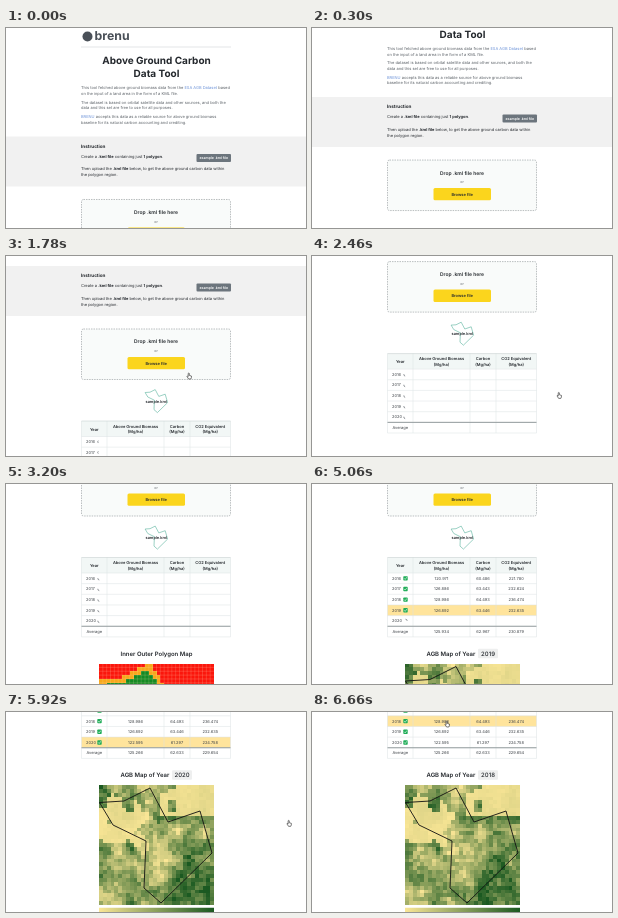
Animation, 300 px wide and 200 px high, one loop 6680 ms. Source, as an HTML page with a canvas:

```html
<!DOCTYPE html>
<html lang="en">
<head>
<meta charset="utf-8">
<title>Above Ground Carbon Data Tool</title>
<style>
html, body { margin: 0; width: 300px; height: 200px; overflow: hidden; background: #fff; }
canvas { display: block; }
</style>
</head>
<body>
<canvas id="stage" width="300" height="200"></canvas>
<script>
const LOOP = 6680;
const ctx = document.getElementById('stage').getContext('2d');
ctx.textRendering = 'geometricPrecision';

const INK = '#24282d', GREY = '#5c6268', CELL = '#3c4146', RULE = '#dbe1e3';
const PALE = [250, 230, 150], DENSE = [27, 89, 33];
const MAP = { x: 93, y: 369.5, w: 115, h: 120, cols: 30, rows: 31 };
const TABLE = { top: 263.5, body: 279, rowH: 10.65, cols: [75.5, 101, 158, 184, 224.5] };
const CENTERS = TABLE.cols.slice(1).map((x, i) => (x + TABLE.cols[i]) / 2);
const BIOMASS = [120.971, 126.886, 128.986, 126.892, 122.595];
const YEARS = BIOMASS.map((_, i) => 2016 + i);
const UPLOAD = 1640, OUTLINE_MAP = 2900, FIRST_ROW = 4160, ROW_STEP = 285;

const parcel = new Path2D('M.5 17.5L25 16L51 3L69 37L101 26L113 68L62 118L45 103L47 56L14 40Z');

// Key points: time, then values
const SCROLL = [[0, 0], [690, 98.5], [2080, 98.5], [2660, 190], [5445, 190], [5880, 296.5], [LOOP, 296.5]];
const UPLOAD_PATH = [[700, -6, 188], [1360, 79, 98], [1780, 182, 117], [2700, 258, 140], [3100, 304, 150]];
const HOVER_PATH = [[5860, 304, 120], [6120, 134, 30], [6580, 134, 9], [LOOP, 134, 9]];

const mix = (a, b, u) => a + (b - a) * u;
const ease = u => (1 - Math.cos(Math.PI * u)) / 2;

// Eased values at time t, or null outside the keys
function follow(keys, t) {
  const i = keys.findIndex(k => k[0] > t);
  if (i < 1) return null;
  const [t0, ...from] = keys[i - 1], [t1, ...to] = keys[i];
  return from.map((v, k) => mix(v, to[k], ease((t - t0) / (t1 - t0))));
}

function hash(x, y, seed) {
  const v = Math.sin(x * 127.1 + y * 311.7 + seed * 74.7) * 43758.5453;
  return v - Math.floor(v);
}

function noise(x, y, seed) {
  const i = Math.floor(x), j = Math.floor(y), u = ease(x - i), v = ease(y - j);
  return mix(mix(hash(i, j, seed), hash(i + 1, j, seed), u),
    mix(hash(i, j + 1, seed), hash(i + 1, j + 1, seed), u), v);
}

function raster(color) {
  const tile = document.createElement('canvas');
  tile.width = MAP.cols;
  tile.height = MAP.rows;
  const g = tile.getContext('2d');
  for (let r = 0; r < MAP.rows; r++)
    for (let c = 0; c < MAP.cols; c++) {
      g.fillStyle = color(c * MAP.w / MAP.cols, r * MAP.h / MAP.rows);
      g.fillRect(c, r, 1, 1);
    }
  return tile;
}

const outlineMap = raster((x, y) => {
  let hits = 0;
  for (let i = 0; i < 9; i++)
    hits += ctx.isPointInPath(parcel, x + i % 3 * 1.9, y + Math.floor(i / 3) * 1.9);
  return hits === 9 ? '#148a23' : hits ? '#f7a81b' : '#fb160c';
});

// Noisy forest with ragged clearings at upper left and upper right
const yearMaps = YEARS.map(year => raster((x, y) => {
  const clearing = Math.min(Math.hypot(x - 19, y - 40) / 25, Math.hypot(x - 93, y - 8) / 29);
  const ragged = clearing + noise(x / 9, y / 9, 5) - .5;
  const forest = .5 + .8 * (noise(x / 15, y / 15, 2) - .5)
    + .3 * (noise(x / 8, y / 8, year) - .5) + .35 * (hash(x, y, year) - .5);
  const v = Math.min(1, Math.max(0, ragged < .9 ? forest * .12 : forest));
  return `rgb(${PALE.map((p, i) => Math.round(mix(p, DENSE[i], v)))})`;
}));

function box(x, y, w, h, fill, radius = 0) {
  ctx.fillStyle = fill;
  ctx.beginPath();
  ctx.roundRect(x, y, w, h, radius);
  ctx.fill();
}

function line(x1, y1, x2, y2, color, width = .5) {
  ctx.strokeStyle = color;
  ctx.lineWidth = width;
  ctx.beginPath();
  ctx.moveTo(x1, y1);
  ctx.lineTo(x2, y2);
  ctx.stroke();
}

function outline(path, x, y, scale, color, width) {
  ctx.save();
  ctx.translate(x, y);
  ctx.scale(scale, scale);
  ctx.strokeStyle = color;
  ctx.lineWidth = width / scale;
  ctx.stroke(path);
  ctx.restore();
}

// y is the visual middle of the line
function text(s, x, y, size = 4, { weight = 400, color = INK, align = 'center' } = {}) {
  ctx.font = `${weight} ${size}px Inter, sans-serif`;
  ctx.textAlign = align;
  ctx.fillStyle = color;
  ctx.fillText(s, x, y + size * .35);
  return ctx.measureText(s).width;
}

// Left-aligned line whose *marked* parts take another style
function rich(s, y, color, marked) {
  let x = 75;
  s.split('*').forEach((part, i) => {
    x += text(part, x, y, 4, { color, align: 'left', ...(i % 2 ? marked : {}) });
  });
}

const INTRO = [
  'This tool fetched above ground biomass data from the *ESA AGB Dataset* based',
  'on the input of a land area in the form of a KML file.',
  'The dataset is based on orbital satellite data and other sources, and both the',
  'data and this set are free to use for all purposes.',
  '*BRENU* accepts this data as a reliable source for above ground biomass',
  'baseline for its natural carbon accounting and crediting.'
];

function drawIntro() {
  box(76.5, 3.5, 10, 10, '#4a5058', 5);
  text('brenu', 88.5, 8, 12.3, { weight: 700, color: '#4a5058', align: 'left' });
  line(75, 19, 225, 19, '#c9cdd0');
  text('Above Ground Carbon', 150.5, 33, 10, { weight: 700 });
  text('Data Tool', 150.5, 45.5, 10, { weight: 700 });
  INTRO.forEach((s, i) =>
    rich(s, 59.8 + Math.floor(i / 2) * 14.4 + i % 2 * 5.8, GREY, { color: '#6d93d8' }));

  box(0, 108.5, 300, 50, '#f1f1f1');
  const bold = { weight: 700 };
  text('Instruction', 75, 118.3, 4.6, { weight: 700, align: 'left' });
  rich('Create a *.kml file* containing just *1 polygon*.', 128.5, INK, bold);
  rich('Then upload the *.kml file* below, to get the above ground carbon data within', 140.9, INK, bold);
  rich('the polygon region.', 146.8, INK);
  box(190.5, 126, 34.5, 8, '#6c757d', 1);
  text('example .kml file', 207.8, 130, 3.5, { weight: 600, color: '#fff' });
}

function drawUpload(t) {
  box(75.5, 171.5, 149, 50.5, '#f9fbfa', 2);
  ctx.strokeStyle = '#8f9599';
  ctx.lineWidth = .6;
  ctx.setLineDash([1.5, 1]);
  ctx.stroke();
  ctx.setLineDash([]);
  text('Drop .kml file here', 150, 184.2, 5, { weight: 600 });
  text('or', 150, 193.6, 3.6, { color: GREY });
  box(121.5, 199.5, 57.5, 12.3, '#fbd51d', 1.5);
  text('Browse file', 150.2, 205.7, 4, { weight: 600 });
  if (t < UPLOAD) return;
  outline(parcel, 139, 231.5, .2, '#58b39c', .6);
  text('sample.kml', 150.3, 244, 3.9, { weight: 600 });
}

function drawStatus(x, y, t, done) {
  if (done) {
    box(x - 2.2, y - 2.2, 4.4, 4.4, '#20ad58', .7);
    outline(new Path2D('M-1.3 0L-.3 1.1L1.4-1.2'), x, y, 1, '#fff', .6);
  } else if (t >= UPLOAD) {
    const turn = t / 750 * 2 * Math.PI;
    ctx.strokeStyle = '#4d555b';
    ctx.lineWidth = .6;
    ctx.beginPath();
    ctx.arc(x, y, 1.7, turn, turn + Math.PI / 2);
    ctx.stroke();
  }
}

function drawValues(biomass, y) {
  const carbon = biomass / 2;
  [biomass, carbon, carbon * 44 / 12].forEach((v, i) =>
    text(v.toFixed(3), CENTERS[i + 1], y, 4, { color: CELL }));
}

function drawTable(t, active, count) {
  const { top, body, rowH, cols } = TABLE, bottom = body + rowH * 6;
  const rowMiddle = i => body + (i + .5) * rowH;
  box(75.5, top, 149, body - top, '#f2f7f6');
  if (active >= 0) box(75.5, body + active * rowH, 149, rowH, '#ffe49c');
  cols.forEach(x => line(x, top, x, bottom, RULE));
  line(75.5, top, 224.5, top, '#bfc9c9');
  for (let y = body; y < bottom + 1; y += rowH) line(75.5, y, 224.5, y, RULE);
  line(75.5, bottom - rowH, 224.5, bottom - rowH, '#8c9396', .9);

  const head = { weight: 600 };
  text('Year', CENTERS[0], 271.7, 4, head);
  ['Above Ground Biomass', 'Carbon', 'CO2 Equivalent'].forEach((s, i) => {
    text(s, CENTERS[i + 1], 268.8, 4, head);
    text('(Mg/ha)', CENTERS[i + 1], 274.4, 4, head);
  });
  YEARS.forEach((year, i) => {
    text(year, 80, rowMiddle(i), 4, { align: 'left', color: CELL });
    drawStatus(93.5, rowMiddle(i), t, i < count);
    if (i < count) drawValues(BIOMASS[i], rowMiddle(i));
  });
  text('Average', CENTERS[0], rowMiddle(5), 4, { color: CELL });
  if (count) drawValues(BIOMASS.slice(0, count).reduce((a, b) => a + b) / count, rowMiddle(5));
}

function drawMap(t, active) {
  if (t < OUTLINE_MAP) return;
  const { x, y, w, h, cols, rows } = MAP;
  ctx.imageSmoothingEnabled = false;
  ctx.drawImage(active < 0 ? outlineMap : yearMaps[active], x, y, w, h);
  if (active < 0) {
    text('Inner Outer Polygon Map', 150.5, 359.5, 6, { weight: 600 });
    const grid = 'rgba(255,225,190,.45)';
    for (let c = 1; c < cols; c++) line(x + c * w / cols, y, x + c * w / cols, y + h, grid, .4);
    for (let r = 1; r < rows; r++) line(x, y + r * h / rows, x + w, y + r * h / rows, grid, .4);
    return;
  }
  text('AGB Map of Year', 114.5, 359.5, 6, { weight: 600, align: 'left' });
  box(166, 354.7, 20, 9.6, '#eeefef', 1.2);
  text(YEARS[active], 176, 359.5, 6, { weight: 500 });
  outline(parcel, x, y, 1, '#111', .9);
  const bar = ctx.createLinearGradient(x, 0, x + w, 0);
  bar.addColorStop(0, `rgb(${PALE})`);
  bar.addColorStop(1, `rgb(${DENSE})`);
  box(x, 492.3, w, 6, bar);
}

function drawPointer([x, y]) {
  const hand = new Path2D('M.2.4Q.8-.3 1.3.4V2.4L3.4 3V4.6L2.8 6H.6L-1 3.6L-.6 3L.2 3.6Z');
  ctx.save();
  ctx.translate(x, y);
  ctx.fillStyle = '#fff';
  ctx.fill(hand);
  ctx.restore();
  outline(hand, x, y, 1, '#222', .6);
}

function draw(t) {
  const [scroll] = follow(SCROLL, t);
  const hover = follow(HOVER_PATH, t);
  const pointer = hover || follow(UPLOAD_PATH, t);
  const count = Math.min(YEARS.length, Math.max(0, Math.floor((t - FIRST_ROW) / ROW_STEP) + 1));
  // The newest row is shown until the pointer picks another
  const picked = hover ? Math.floor((hover[1] + scroll - TABLE.body) / TABLE.rowH) : Infinity;
  const active = Math.min(count - 1, picked);

  box(0, 0, 300, 200, '#fff');
  ctx.save();
  ctx.translate(0, -scroll);
  drawIntro();
  drawUpload(t);
  drawTable(t, active, count);
  drawMap(t, active);
  ctx.restore();
  if (pointer) drawPointer(pointer);
}

const began = performance.now();
function tick() {
  draw(Math.max(0, performance.now() - began) % LOOP);
  requestAnimationFrame(tick);
}
tick();
</script>
</body>
</html>
```
